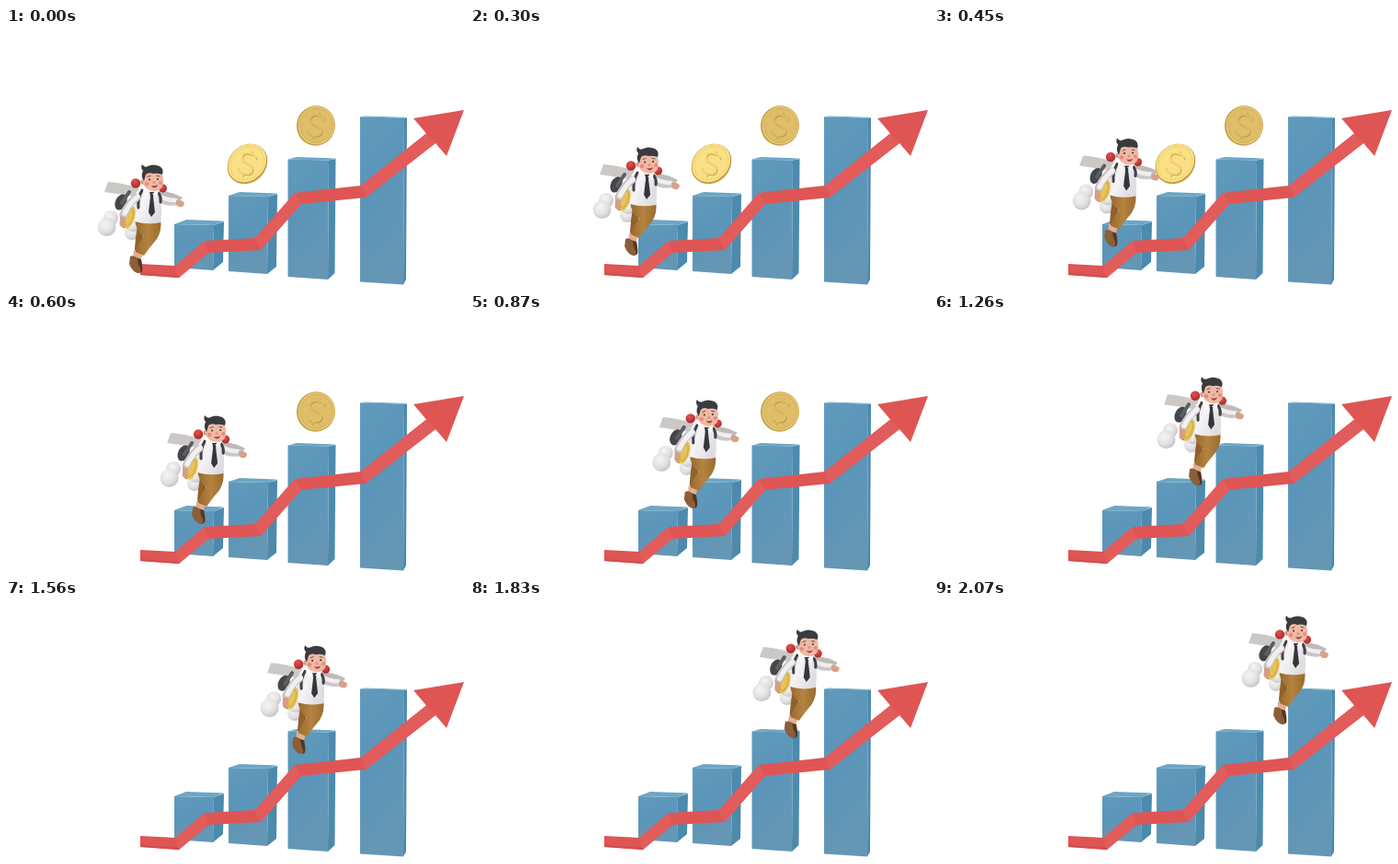
Recreate the animation shown at these times as an HTML page. Size 498 px wide and 280 px high, loop 2100 ms.

```html
<!DOCTYPE html>
<html lang="en">
<head>
<meta charset="utf-8">
<title>Growth chart</title>
<style>
  html, body { margin: 0; width: 100%; height: 100%; overflow: hidden; background: #fff; }
  svg { display: block; width: 100vw; height: 100vh; }
</style>
</head>
<body>
<svg viewBox="0 0 498 280" stroke-linejoin="round" stroke-linecap="round">
  <defs>
    <linearGradient id="front" x1="0" y1="0" x2=".3" y2="1">
      <stop offset="0" stop-color="#619abb"/><stop offset=".5" stop-color="#5a95b9"/><stop offset="1" stop-color="#6597b5"/>
    </linearGradient>
    <radialGradient id="puff" cx=".4" cy=".35" r=".7">
      <stop offset="0" stop-color="#f6f5f5"/><stop offset=".6" stop-color="#e2e0e0"/><stop offset="1" stop-color="#c1bfc0"/>
    </radialGradient>
    <linearGradient id="shirt" x1="0" y1="0" x2="1" y2=".5">
      <stop offset="0" stop-color="#d3d0d2"/><stop offset=".4" stop-color="#f6f4f5"/><stop offset="1" stop-color="#dfdcdf"/>
    </linearGradient>
    <linearGradient id="pants" x1="0" y1="0" x2="1" y2="0">
      <stop offset="0" stop-color="#96692f"/><stop offset=".5" stop-color="#b5833f"/><stop offset="1" stop-color="#9a6c30"/>
    </linearGradient>
    <radialGradient id="red" cx=".4" cy=".3" r=".8">
      <stop offset="0" stop-color="#e8504c"/><stop offset="1" stop-color="#9c2529"/>
    </radialGradient>
    <path id="sign" d="M8-8C5-13-7-12-7-5C-7 2 8-2 8 6C8 13-5 13-8 8M1-14V-11M0 11V14" fill="none" stroke-width="1.8"/>
  </defs>

  <g id="bars"></g>

  <g id="coin1" transform="translate(262.5 147.5)">
    <g transform="rotate(-45)">
      <ellipse rx="23.5" ry="20" fill="#c39d42"/>
      <ellipse cx=".5" cy="-.8" rx="22.5" ry="18.800" fill="#fae085"/>
      <ellipse cx=".5" cy="-.8" rx="20" ry="16.300" fill="none" stroke="#edcf70" stroke-width=".8"/>
    </g>
    <g transform="rotate(18)">
      <use href="#sign" stroke="#c7a044"/>
      <use href="#sign" x="-.9" y="-.7" stroke="#f6da7b"/>
    </g>
  </g>
  <g id="coin2" transform="translate(337 106) rotate(12)">
    <ellipse rx="21" ry="21.7" fill="#c19d48"/>
    <ellipse cx=".6" cy="-.4" rx="20" ry="20.8" fill="#e3c470"/>
    <ellipse cx=".6" cy="-.4" rx="17.500" ry="18.300" fill="#dfbe69" stroke="#d0ad56" stroke-width=".8"/>
    <use href="#sign" stroke="#ba9440"/>
    <use href="#sign" x="-.9" y="-.7" stroke="#dfbe69"/>
  </g>

  <g id="arrow">
    <path fill="#de5554" d="M146 256L184 258L216 231L271 228L314 179L386 171L457 114.500L443 98L498 89L479 139L467 125L391 184L321 191L277 241L220 244L188 271L146 268Z"/>
    <path fill="#e25c5b" d="M184 258L216 231L220 244L188 271ZM271 228L314 179L321 191L277 241ZM386 171L457 114.500L467 125L391 184Z"/>
    <path fill="#d04d4d" d="M146 266L187 269L188 271L146 268Z"/>
  </g>

  <g id="man">
    <g fill="url(#puff)">
      <circle cx="137" cy="222" r="8"/><circle cx="138" cy="214" r="7"/>
      <circle cx="114" cy="206" r="8"/><circle cx="109.500" cy="216" r="10"/>
    </g>
    <path fill="#cbc8c6" d="M111 167Q127 168 145 174L139 183Q122 180 107 178Z"/>
    <path fill="#bdbab8" d="M168 177Q182 178 192 184L185 192L168 189Z"/>
    <ellipse cx="125" cy="189" rx="6" ry="9" transform="rotate(25 125 189)" fill="#45464a"/>
    <path d="M134 178L126 190" stroke="#5d5e63" stroke-width="4"/>
    <circle cx="141" cy="168.500" r="5.200" fill="url(#red)"/>
    <circle cx="170.500" cy="174" r="4.500" fill="url(#red)"/>

    <!-- legs and shoes -->
    <path fill="#e5ad91" d="M139 241L149 243L146 254L138 252Z"/>
    <path fill="none" stroke="#8f622c" stroke-width="8" d="M147 214L145 228L144 239"/>
    <path fill="url(#pants)" d="M140 207H168Q170 219 164 229Q157 237 150 247L141 243Q142 236 150 226Q141 220 140 207Z"/>
    <path fill="#56371f" d="M141 249L147 251Q149 260 148 264Q146 267 142 265Z"/>
    <path fill="#8a5f39" d="M135 248Q139 246 143 250Q143 256 146 261Q147 266 143 266Q137 264 134 256Z"/>

    <!-- body -->
    <path fill="none" stroke="#cbc7c9" stroke-width="8" d="M164 183Q173 190 184 188.500"/>
    <path fill="none" stroke="#f0eef0" stroke-width="4.500" d="M164 181Q174 187 184 187"/>
    <path fill="#d9a08a" d="M185 187Q191 186 194 190Q193 195 189 194Q186 194 185 191Z"/>
    <path fill="url(#shirt)" d="M144 178Q155 174 166 179Q171 193 168 211Q154 214 140 210Q137 190 144 178Z"/>
    <path fill="none" stroke="#404146" stroke-width="3" d="M148 176Q143 185 144 195M166 179Q169 184 168 189"/>
    <path fill="#35363d" d="M156 178L161 178L160 183L162 200L158 205L155 200L157 183Z"/>
    <path fill="#faf9fa" d="M149 175L157 180L152 184ZM166 176L159 180L164 184Z"/>

    <!-- carried coin and near arm -->
    <g transform="translate(133 205) rotate(17)">
      <ellipse cx="-1" rx="7" ry="13" fill="#a88238"/>
      <ellipse cx="1" rx="6" ry="12.500" fill="#e6c358"/>
      <ellipse cx="1" rx="3.800" ry="9.500" fill="none" stroke="#cba442"/>
    </g>
    <path fill="none" stroke="#c6c1c3" stroke-width="8.500" d="M142 184Q133 190 127.500 203"/>
    <path fill="none" stroke="#f1eff0" stroke-width="5.500" d="M143 183Q134.500 190 129 201"/>
    <path fill="#d79d85" d="M124 204L130 206L129 215Q125 218 123.500 213Z"/>

    <!-- head -->
    <circle cx="149" cy="167" r="2.700" fill="#d99a84"/>
    <path fill="#efb9a4" d="M149 160Q152 154 160 154Q170 154 171 163Q172 177 161 177Q149 176 149 165Z"/>
    <circle cx="153" cy="169" r="2.200" fill="#e88a7d"/>
    <circle cx="168" cy="168" r="2" fill="#e88a7d"/>
    <path fill="#3a3b3e" d="M148 148Q151 152 154 150Q160 147 167 150Q172 153 170 159Q164 157 160 158Q155 156 152 159L150 166Q146 161 149 155Q146 152 148 148Z"/>
    <circle cx="156" cy="164.500" r="1" fill="#3b302b"/>
    <circle cx="165" cy="164" r="1" fill="#3b302b"/>
    <circle cx="161" cy="167.500" r="1.500" fill="#e2917e"/>
    <path fill="#a04a44" d="M158 171Q162 172 165 170Q164 173.500 161 173.500Q159 173 158 171Z"/>
    <path fill="none" stroke="#4a3a34" stroke-width=".8" d="M154 161.500L157 160.500M164 160.500L167 161"/>
  </g>
</svg>
<script>
  const $ = id => document.getElementById(id);
  const poly = (fill, ...pts) => `<polygon fill="${fill}" points="${pts}"/>`;

  // left, front right edge, right, top back, top front, bottom left, bottom front, bottom right
  const bar = ([l, m, r, back, top, bl, bm, br]) =>
    poly('#4c8aae', m, top + 1, r, back + 2, r - 1, br, m - 1, bm) +
    poly('url(#front)', l, top, m, top + 1, m - 1, bm, l, bl) +
    poly('#6ba7c5', l, top, l + (r - m) + 2, back, r, back + 1.5, m, top + 1);

  $('bars').innerHTML = [
    [183, 226, 237, 208, 213, 260, 263, 254],
    [242, 285, 295, 178, 182, 264, 267, 259],
    [306.5, 351, 358.5, 140, 142.5, 270, 273, 266],
    [385, 433, 436, 95.5, 96.5, 275.5, 278.5, 273]
  ].map(bar).join('');

  const STEP = 30, STEPS = 70;
  const show = (id, on) => $(id).setAttribute('visibility', on ? 'visible' : 'hidden');
  const start = performance.now();

  function draw() {
    const n = Math.floor(Math.max(0, performance.now() - start) / STEP) % STEPS;
    $('man').setAttribute('transform', `translate(${n * 3.406} ${n * -1.9})`);
    show('coin1', n < 16);
    show('coin2', n < 38);
    requestAnimationFrame(draw);
  }
  draw();
</script>
</body>
</html>
```
